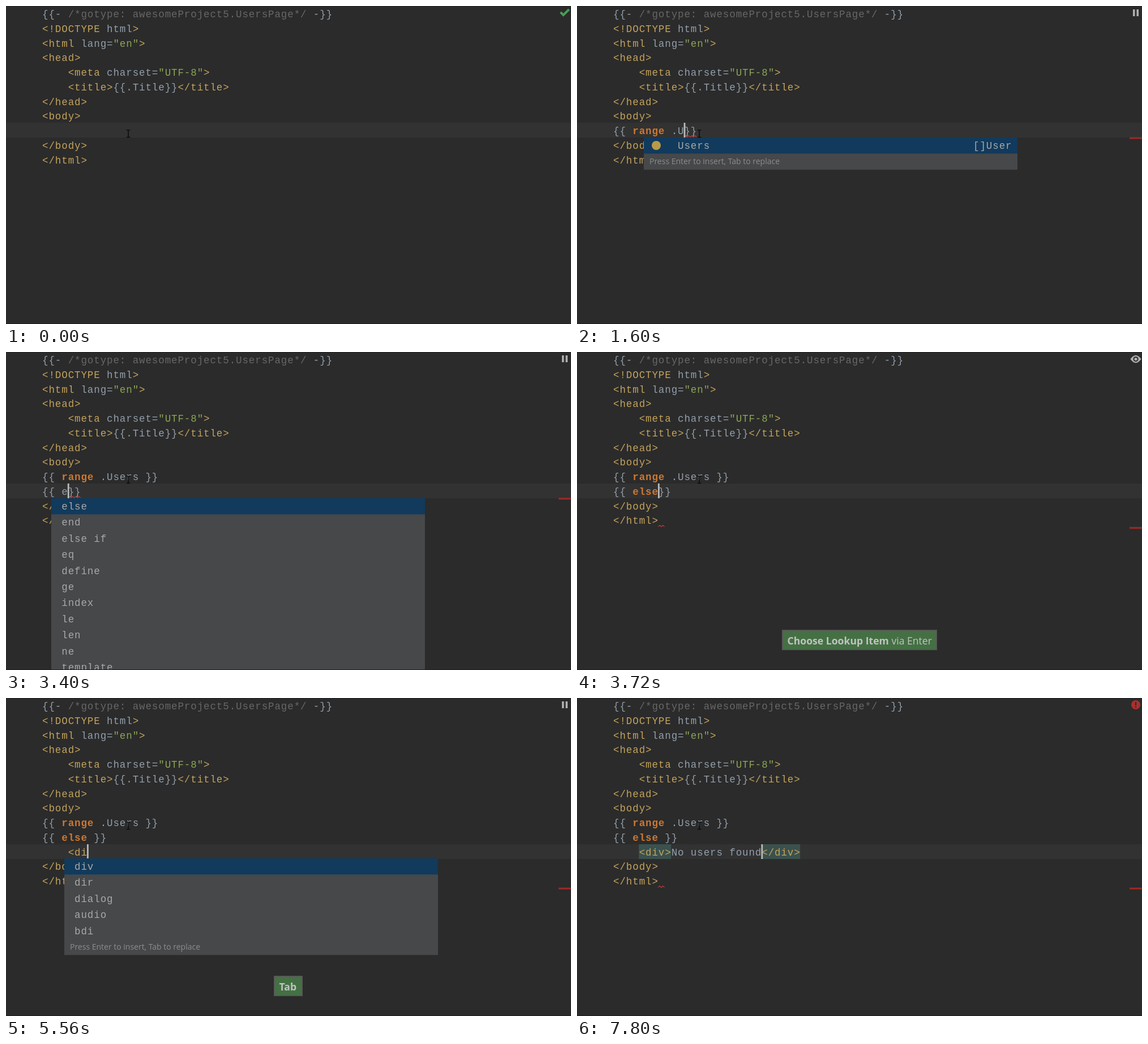
Recreate the animation shown at these times as an HTML page with a canvas. Size 998 px wide and 561 px high, loop 8000 ms.

```html
<!DOCTYPE html>
<html lang="en">
<head>
<meta charset="UTF-8">
<title>Template editor</title>
<style>
  html, body { margin: 0; height: 100%; overflow: hidden; background: #2b2b2b; }
  canvas { display: block; }
</style>
</head>
<body>
<canvas id="stage" width="998" height="561"></canvas>
<script>
const ctx = document.getElementById('stage').getContext('2d');
const LOOP = 8000, LEFT = 63.6, CHAR = 11.4, ROW = 25.75, ITEM = 28.4;
const MONO = '17.5px "Liberation Mono", "Courier New", monospace';
const SANS = '"Open Sans", "Noto Sans", sans-serif';

const head = [
  '{{- /*gotype: awesomeProject5.UsersPage*/ -}}',
  '<!DOCTYPE html>',
  '<html lang="en">',
  '<head>',
  '    <meta charset="UTF-8">',
  '    <title>{{.Title}}</title>',
  '</head>',
  '<body>',
];
const tail = ['</body>', '</html>'];

const keywords = ['else', 'end', 'else if', 'eq', 'define', 'ge', 'index', 'le', 'len', 'ne', 'template'];
const tags = ['a', 'abbr', 'acronym', 'address', 'applet', 'area', 'article', 'aside', 'audio', 'b'];
const dTags = ['data', 'datalist', 'dd', 'del', 'details', 'dfn', 'dialog', 'dir', 'div', 'dl'];
const popup = (x, textX, items) => ({ x, textX, items });
const fields = items => popup(118, 177.6, items);
const words = items => popup(80, 97.8, items);
const elements = items => popup(103, 120.6, items);

// Each event changes part of the state; "|" marks the caret.
const events = [];
const at = (time, change) => events.push([time, change]);

at(0, { a: '|', icon: 'check', caret: false });
at(200, { caret: true });
at(400, { a: '{|}' });
at(520, { a: '{{|}}', icon: 'eye' });
at(680, { a: '{{ |}}' });
at(720, { error: 'braces' });
for (let i = 1; i <= 5; i++) at(680 + i * 80, { a: `{{ ${'range'.slice(0, i)}|}}` });
at(1160, { a: '{{ range |}}' });
at(1320, { a: '{{ range .|}}', icon: 'pause' });
at(1400, { popup: fields(['Title string', 'Users []User']) });
at(1520, { a: '{{ range .U|}}' });
at(1600, { popup: fields(['Users []User']) });
at(1760, { a: '{{ range .Users|}}', popup: null });
at(1800, { badge: ['Choose Lookup Item', ' via Enter'], icon: 'eye' });
at(1960, { a: '{{ range .Users |}}' });
at(2000, { error: 'end', icon: 'error' });
at(2200, { a: '{{ range .Users }|}' });
at(2280, { a: '{{ range .Users }}|', match: ['{{', '}}'] });
at(2480, { b: '|', match: [], icon: 'eye' });
at(2680, { icon: 'error' });
at(2720, { b: '{|}' });
at(2800, { b: '{{|}}', icon: 'eye' });
at(3040, { error: 'braces', icon: 'error' });
at(3200, { b: '{{ |}}', icon: 'eye' });
at(3360, { b: '{{ e|}}', icon: 'pause' });
at(3400, { popup: words(keywords) });
at(3480, { b: '{{ el|}}' });
at(3520, { popup: words(['else', 'else if']) });
at(3720, { b: '{{ else|}}', popup: null, error: 'end', icon: 'eye' });
at(3840, { icon: 'error' });
at(4000, { b: '{{ else |}}' });
at(4040, { icon: 'eye', match: ['{{', '}}'] });
at(4200, { b: '{{ else }|}', icon: 'error' });
at(4280, { b: '{{ else }}|' });
at(4480, { c: '|', match: [], icon: 'eye' });
at(4800, { c: '    |', badge: ['Tab', ''], icon: 'error' });
at(4920, { icon: 'eye' });
at(5040, { c: '    <|', icon: 'pause' });
at(5160, { popup: elements(tags) });
at(5400, { c: '    <d|' });
at(5440, { popup: elements(dTags) });
at(5520, { c: '    <di|' });
at(5560, { popup: elements(['div', 'dir', 'dialog', 'audio', 'bdi']) });
at(5920, { c: '    <div|' });
at(5960, { popup: null, icon: 'eye' });
at(6200, { c: '    <div>|</div>', match: ['<div'] });
at(6240, { error: 'tag', icon: 'error' });
at(6400, { icon: 'eye' });
const message = 'No users found';
for (let i = 1; i <= 14; i++) {
  const time = i <= 11 ? 6600 + i * 80 : 7080 + i * 40;
  at(time, { c: `    <div>${message.slice(0, i)}|</div>` });
}
at(6760, { match: ['<div>', '</div>'], error: 'end', icon: 'error' });
at(6920, { icon: 'eye' });
at(7000, { badge: null });
at(7560, { icon: 'pause' });
at(7800, { icon: 'error' });
events.sort((p, q) => p[0] - q[0]);

const colX = col => LEFT + col * CHAR;
const rowY = row => Math.round(row * ROW);

function rect(color, x, y, w, h) {
  ctx.fillStyle = color;
  ctx.fillRect(x, y, w, h);
}

function disc(color, x, y, r) {
  ctx.fillStyle = color;
  ctx.beginPath();
  ctx.arc(x, y, r, 0, 7);
  ctx.fill();
}

function stroke(color, width, points) {
  ctx.strokeStyle = color;
  ctx.lineWidth = width;
  ctx.beginPath();
  points.forEach(([x, y]) => ctx.lineTo(x, y));
  ctx.stroke();
}

// Glyphs sit centred in the cells of the character grid.
function monoText(text, x, y, color, bold) {
  ctx.font = (bold ? 'bold ' : '') + MONO;
  ctx.fillStyle = color;
  ctx.textAlign = 'center';
  [...text].forEach((ch, i) => ctx.fillText(ch, x + (i + 0.5) * CHAR, y));
  ctx.textAlign = 'left';
}

function codeLine(text, row) {
  const tokens = /(\/\*.*?\*\/)|(".*?")|\b(range|else)\b|(<!DOCTYPE|<\/?\w+|>)|./g;
  for (const m of text.matchAll(tokens)) {
    const color = m[1] ? '#676767' : m[2] ? '#8ca656' : m[3] ? '#cc7832'
      : m[4] ? '#c4a35c' : '#929fab';
    monoText(m[0], colX(m.index), row * ROW + 20.2, color, m[3]);
  }
}

function squiggle(row, col, count) {
  const bottom = rowY(row + 1), points = [];
  for (let x = 0, i = 0; x <= count * CHAR; x += 2.8, i++)
    points.push([colX(col) + x, bottom - (i % 2 ? 3.2 : 0.8)]);
  stroke('#bc3f3c', 1.1, points);
  rect('#9e2927', 976, (row + 1) * ROW - 0.2, 22, 3);
}

const icons = {
  check() {
    stroke('#499c54', 4, [[979.5, 11], [984.5, 16], [994.5, 6]]);
  },
  eye() {
    ctx.fillStyle = '#afb1b3';
    ctx.beginPath();
    ctx.moveTo(977.5, 12.5);
    ctx.quadraticCurveTo(987, -1, 996.5, 12.5);
    ctx.quadraticCurveTo(987, 26, 977.5, 12.5);
    ctx.fill();
    disc('#2b2b2b', 987, 12.5, 4.6);
    disc('#afb1b3', 987, 12.5, 2.6);
  },
  pause() {
    rect('#afb1b3', 982, 6, 3.5, 12);
    rect('#afb1b3', 988.5, 6, 3.5, 12);
  },
  error() {
    disc('#a9302d', 987, 12, 8);
    rect('#2b2b2b', 985.9, 7, 2.2, 6);
    rect('#2b2b2b', 985.9, 14.8, 2.2, 2.2);
  },
};

function drawBadge([name, how]) {
  const w = how ? 274 : 51, x = how ? 362 : 473;
  rect('#565856', x, 490, w, 36);
  rect('#457044', x + 2, 492, w - 4, 32);
  ctx.fillStyle = '#c0c4c0';
  ctx.font = `bold 17.6px ${SANS}`;
  ctx.fillText(name, x + 9.5, 516);
  const end = x + 9.5 + ctx.measureText(name).width;
  ctx.font = `17.6px ${SANS}`;
  ctx.fillText(how, end, 516);
}

function drawPopup({ x, textX, items }, top) {
  rect('#46484a', x, top, 660, (items.length + 1) * ITEM);
  rect('#113a5c', x, top, 660, ITEM);
  items.forEach((item, i) => {
    const y = top + i * ITEM + 20;
    const [name, type] = textX - x > 40 ? item.split(' ') : [item];
    monoText(name, textX, y, '#a8a8a8');
    if (!type) return;
    disc('#b99a4b', x + 22, y - 6, 8);
    monoText(type, x + 650 - type.length * CHAR, y, '#a8a8a8');
  });
  ctx.font = `14px ${SANS}`;
  ctx.fillStyle = '#8c8c8c';
  ctx.fillText('Press Enter to insert, Tab to replace', x + 10, top + items.length * ITEM + 19);
}

function drawPointer() {
  const color = '#0c0c0c';
  stroke(color, 1.6, [[216, 219.5], [216, 231]]);
  for (const y of [219, 231.5]) stroke(color, 1.4, [[212.5, y], [219.5, y]]);
}

function draw(time) {
  const s = { match: [] };
  for (const [t, change] of events) if (t <= time) Object.assign(s, change);
  const typed = [s.a, s.b, s.c].filter(line => line !== undefined);
  const active = head.length + typed.length - 1;
  const current = typed[typed.length - 1];
  const caret = current.indexOf('|');
  const lines = [...head, ...typed.map(line => line.replace('|', '')), ...tail];
  const last = lines.length - 1, text = lines[active], top = rowY(active);

  rect('#2b2b2b', 0, 0, 998, 561);
  rect('#323232', 0, top, 998, 26);
  for (const part of s.match)
    rect('#3b514d', colX(text.indexOf(part)), top, part.length * CHAR, 26);
  lines.forEach(codeLine);

  if (s.error === 'braces') squiggle(active, text.indexOf('}}'), 2);
  else if (s.error) squiggle(last, 7, 1);
  if (s.error === 'tag') squiggle(active, 15, 1);

  if (s.caret) rect('#bbbbbb', colX(caret) - 0.4, top, 2.8, 26);
  icons[s.icon]();
  if (s.badge) drawBadge(s.badge);
  if (s.popup) drawPopup(s.popup, rowY(active + 1));
  drawPointer();
  rect('#222222', 0, 0, 998, 1);
  rect('#1f1f1f', 0, 560, 998, 1);
}

function tick() {
  draw(performance.now() % LOOP);
  requestAnimationFrame(tick);
}
tick();
</script>
</body>
</html>
```
